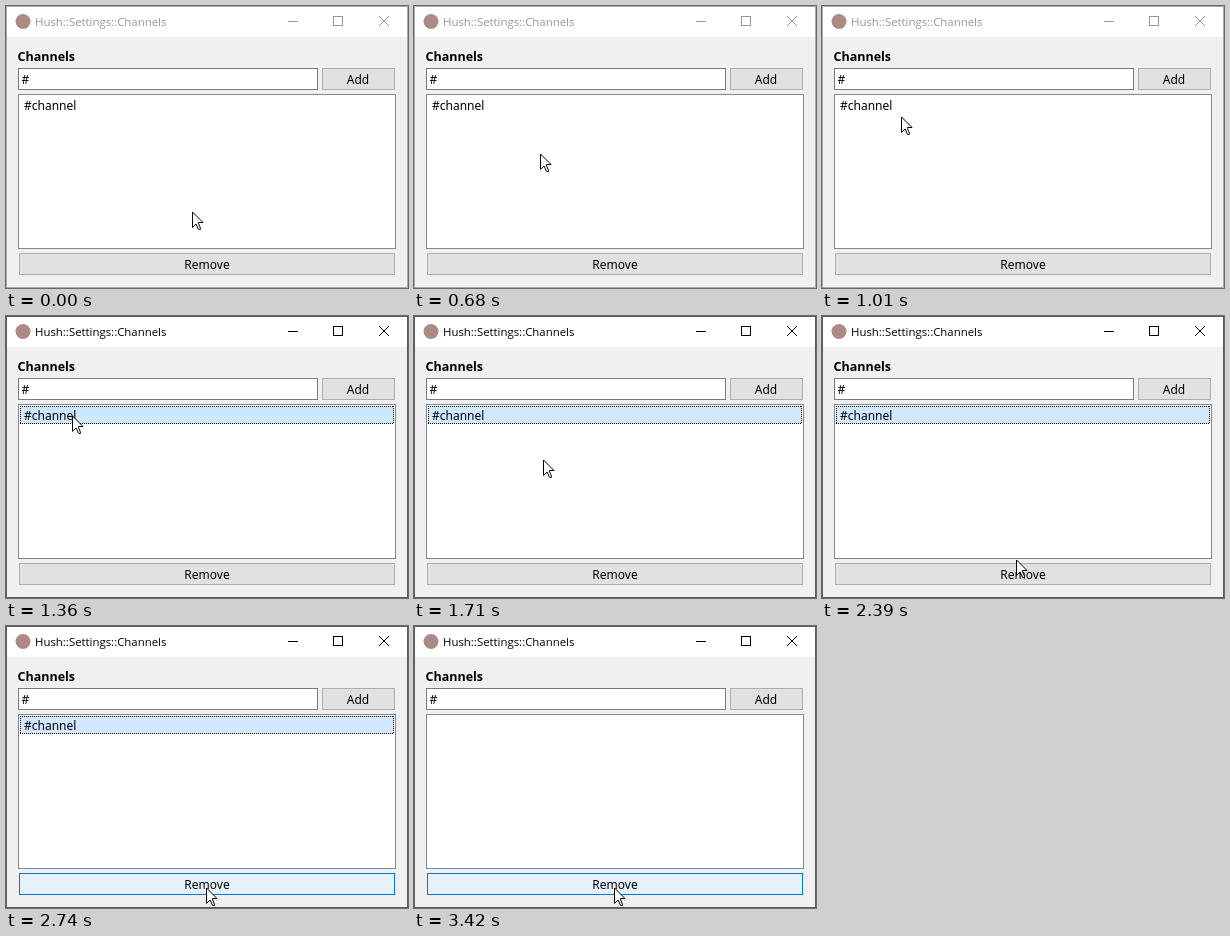
An HTML page for the animation above (3750 ms loop, 402 by 282 pixels).

```html
<!DOCTYPE html>
<html lang="en">
<head>
<meta charset="utf-8">
<title>Channel settings</title>
<style>
  html, body { margin: 0; width: 100%; height: 100%; overflow: hidden; background: #f0f0f0; }
  svg { display: block; width: 402px; height: 282px; }
  text { font: 12px "Noto Sans", "Open Sans", sans-serif; fill: #000; }
  .caption { font: 11.4px "Open Sans", "Noto Sans", sans-serif; }
  .heading { font-size: 12.5px; font-weight: bold; }
  .mid { text-anchor: middle; }
  .button { fill: #e1e1e1; stroke: #adadad; }
  .button.hot { fill: #e5f1fb; stroke: #0078d7; }
  .dots { fill: none; stroke: #000; stroke-dasharray: 1 1; }
</style>
</head>
<body>
<svg viewBox="0 0 402 282">
  <rect width="402" height="282" fill="#f0f0f0"/>
  <rect width="402" height="31" fill="#fff"/>
  <rect id="frame" x=".5" y=".5" width="401" height="281" fill="none"/>
  <circle cx="17" cy="15.5" r="7.5" fill="#ad8a84"/>
  <text id="caption" class="caption" x="29" y="20">Hush::Settings::Channels</text>
  <g id="controls" fill="none">
    <path d="M282 15.5H292"/>
    <rect x="327.5" y="10.5" width="9" height="9"/>
    <path d="M373 10L383 20M383 10L373 20"/>
  </g>

  <text class="heading" x="11.5" y="55">Channels</text>
  <rect x="12.5" y="62.5" width="299" height="21" fill="#fff" stroke="#7a7a7a"/>
  <text x="15.5" y="78">#</text>
  <rect class="button" x="316.5" y="62.5" width="72" height="21"/>
  <text class="mid" x="352" y="78">Add</text>

  <rect x="12.5" y="88.5" width="377" height="154" fill="#fff" stroke="#828790"/>
  <g id="row">
    <g id="selection">
      <rect id="fill" x="14" y="90" width="374" height="18"/>
      <path class="dots" d="M14 90.5H388M14 107.5H388M14.5 90V108M387.5 90V108"/>
    </g>
    <text x="18" y="104">#channel</text>
  </g>

  <rect id="remove" class="button" x="13.5" y="247.5" width="375" height="21"/>
  <text class="mid" x="201" y="263">Remove</text>

  <path id="cursor" fill="#fff" stroke="#000" d="M.5 1V16.4L4.1 13L6.5 18.4H8.5V17.4L6.4 12.2V11.5H11Z"/>
</svg>
<script>
const LOOP = 3750;
const SELECT = 1360, LEAVE = 1710, HOVER = 2740, REMOVE = 3420;

// Pointer stops: start time, x, y
const stops = [
  [0, 186, 205], [680, 126, 147], [1010, 79, 110], [SELECT, 66, 99],
  [LEAVE, 129, 143], [2040, 171, 210], [2390, 194, 243], [HOVER, 200, 261]
];

const el = id => document.getElementById(id);
const set = (id, name, value) => el(id).setAttribute(name, value);
const show = (id, on) => set(id, "visibility", on ? "inherit" : "hidden");

function draw(t) {
  const active = t >= SELECT;
  const [, x, y] = stops.findLast(s => s[0] <= t);

  set("cursor", "transform", `translate(${x} ${y})`);
  set("frame", "stroke", active ? "#5c5c5c" : "#aaa");
  set("controls", "stroke", active ? "#000" : "#999");
  el("caption").style.fill = active ? "#000" : "#949b90";
  show("row", t < REMOVE);
  show("selection", active);
  set("fill", "fill", t < LEAVE ? "#cce8ff" : "#d1e8ff");
  el("remove").classList.toggle("hot", t >= HOVER);
}

const start = performance.now();
function tick() {
  draw((performance.now() - start) % LOOP);
  requestAnimationFrame(tick);
}
tick();
</script>
</body>
</html>
```
